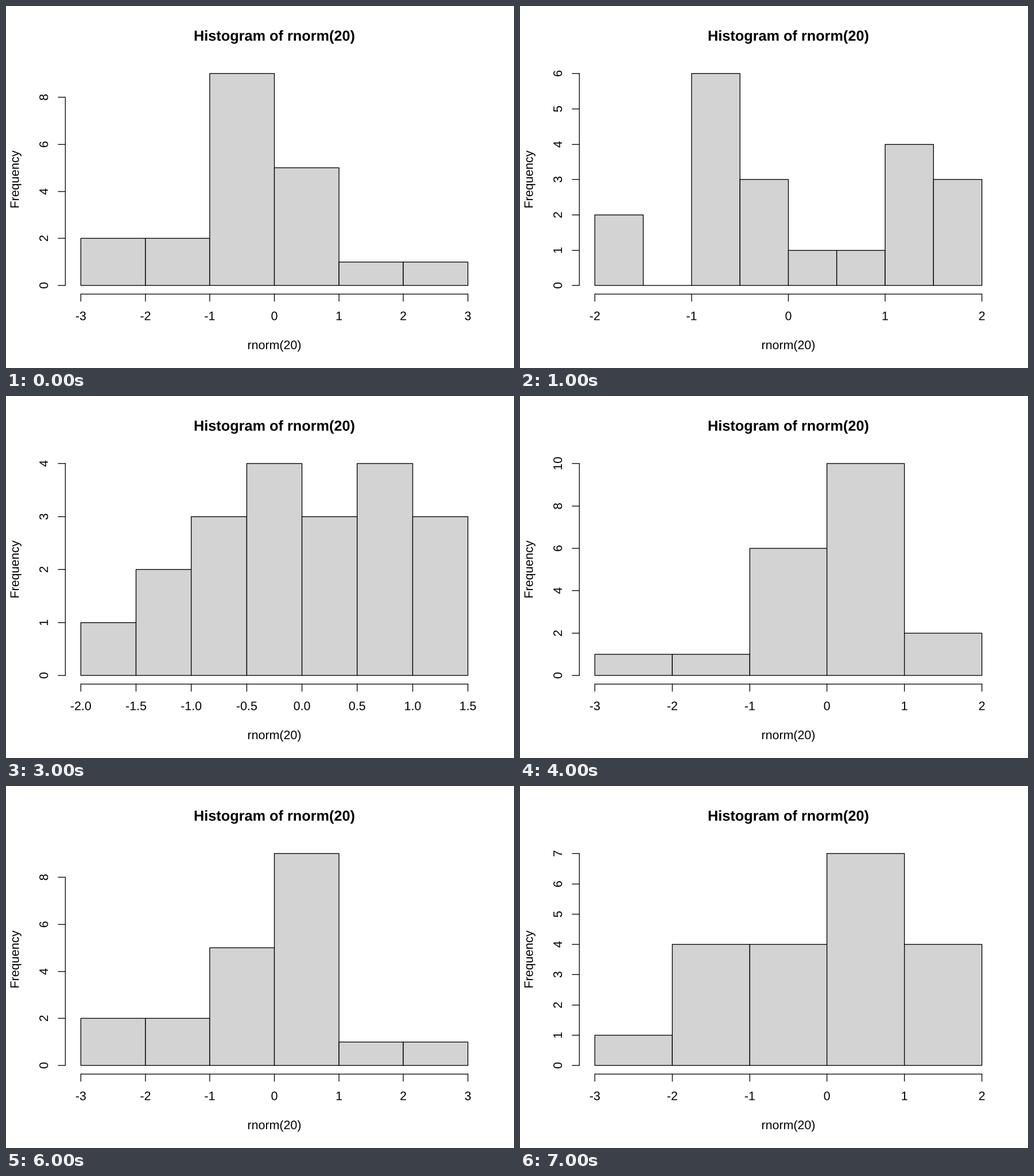
Animation of 885 by 632 pixels, one loop 8 s. Source, as a matplotlib script:

```python
import numpy as np
import matplotlib.pyplot as plt
from matplotlib.animation import FuncAnimation
from matplotlib.patches import PathPatch, Rectangle
from matplotlib.textpath import TextPath
from matplotlib.transforms import Affine2D

# Layout in 1/192 inch on a 7 x 5 inch page, as in base R graphics
W, H, DPI = 1344, 960, 100
STROKE = 2 * 885 / W * 72 / DPI     # two page units, in points
LINE = 38.4                         # one margin line
LEFT, RIGHT = 4.1 * LINE, W - 2.1 * LINE
TOP, BOTTOM = 4.1 * LINE, H - 5.1 * LINE
MARGIN = 0.04 / 1.08                # share of the plot left free on each side
TICK = LINE / 2

# Bin counts of each draw of 20 values, one per second
DRAWS = [
    [2, 2, 9, 5, 1, 1],
    [2, 0, 6, 3, 1, 1, 4, 3],
    [3, 1, 4, 4, 3, 2, 3],
    [1, 2, 3, 4, 3, 4, 3],
    [1, 1, 6, 10, 2],
    [1, 3, 5, 9, 1, 1],
    [2, 2, 5, 9, 1, 1],
    [1, 4, 4, 7, 4],
]

fig = plt.figure(figsize=(8.85, 6.32), dpi=DPI, facecolor="white")
ax = fig.add_axes([0, 0, 1, 1])


def scale(lo, hi, start, end):
    """Map data lo..hi to whole page units inside start..end."""
    pad = (end - start) * MARGIN
    a, b = start + pad, end - pad
    return lambda v: np.floor(a + (v - lo) / (hi - lo) * (b - a))


def line(xs, ys):
    ax.plot(np.floor(xs), np.floor(ys), color="black", lw=STROKE, snap=False,
            solid_capstyle="round", solid_joinstyle="round")


def label(x, y, s, angle=0, size=32.5, weight="normal"):
    """Centre text on x, y by its advance width, with y as the baseline."""
    font = {"family": "Liberation Sans", "weight": weight}

    def right(t):
        return TextPath((0, 0), t, size=size, prop=font).get_extents().x1

    advance = right(s + "|") - right("|")
    place = (Affine2D().translate(-advance / 2, 0).scale(1, -1)
             .rotate_deg(-angle).translate(np.floor(x), np.floor(y)))
    path = TextPath((0, 0), s, size=size, prop=font).transformed(place)
    ax.add_patch(PathPatch(path, fc="black", lw=0, snap=False))


def draw_bars(edges, counts, px, py):
    for x, x_next, n in zip(edges, edges[1:], counts):
        ax.add_patch(Rectangle((px(x), py(0)), px(x_next) - px(x), py(n) - py(0),
                               fc="#d3d3d3", ec="black", lw=STROKE,
                               snap=False, joinstyle="round", zorder=2))


def draw_x_axis(lo, hi, px):
    step = 1 if hi - lo >= 4 else 0.5
    line([px(lo), px(hi)], [BOTTOM, BOTTOM])
    for v in np.arange(lo, hi + step / 2, step):
        line([px(v), px(v)], [BOTTOM, BOTTOM + TICK])
        label(px(v), BOTTOM + 1.8 * LINE, f"{v:.{int(step < 1)}f}")


def draw_y_axis(peak, py):
    ticks = range(0, peak + 1, 2 if peak > 7 else 1)
    line([LEFT, LEFT], [py(0), py(ticks[-1])])
    for v in ticks:
        line([LEFT - TICK, LEFT], [py(v), py(v)])
        label(LEFT - 1.2 * LINE, py(v), str(v), angle=90)


def draw_titles():
    mid_x, mid_y = (LEFT + RIGHT) / 2, (TOP + BOTTOM) / 2
    label(mid_x, TOP / 2 + 13.8, "Histogram of rnorm(20)", size=38.4, weight="bold")
    label(mid_x, BOTTOM + 3.8 * LINE, "rnorm(20)")
    label(LEFT - 3.2 * LINE, mid_y, "Frequency", angle=90)


def draw(i):
    counts = DRAWS[i]
    # Narrow samples get half-unit bins
    lo, width = (-2, 0.5) if len(counts) > 6 else (-3, 1)
    edges = lo + width * np.arange(len(counts) + 1)
    peak = max(counts)
    px = scale(lo, edges[-1], LEFT, RIGHT)
    py = scale(0, peak, BOTTOM, TOP)

    ax.clear()
    ax.set(xlim=(0, W), ylim=(H, 0))
    ax.axis("off")
    draw_bars(edges, counts, px, py)
    draw_x_axis(lo, edges[-1], px)
    draw_y_axis(peak, py)
    draw_titles()
    return []


anim = FuncAnimation(fig, draw, frames=len(DRAWS), interval=1000,
                     repeat=True, repeat_delay=0)
plt.show()
```
